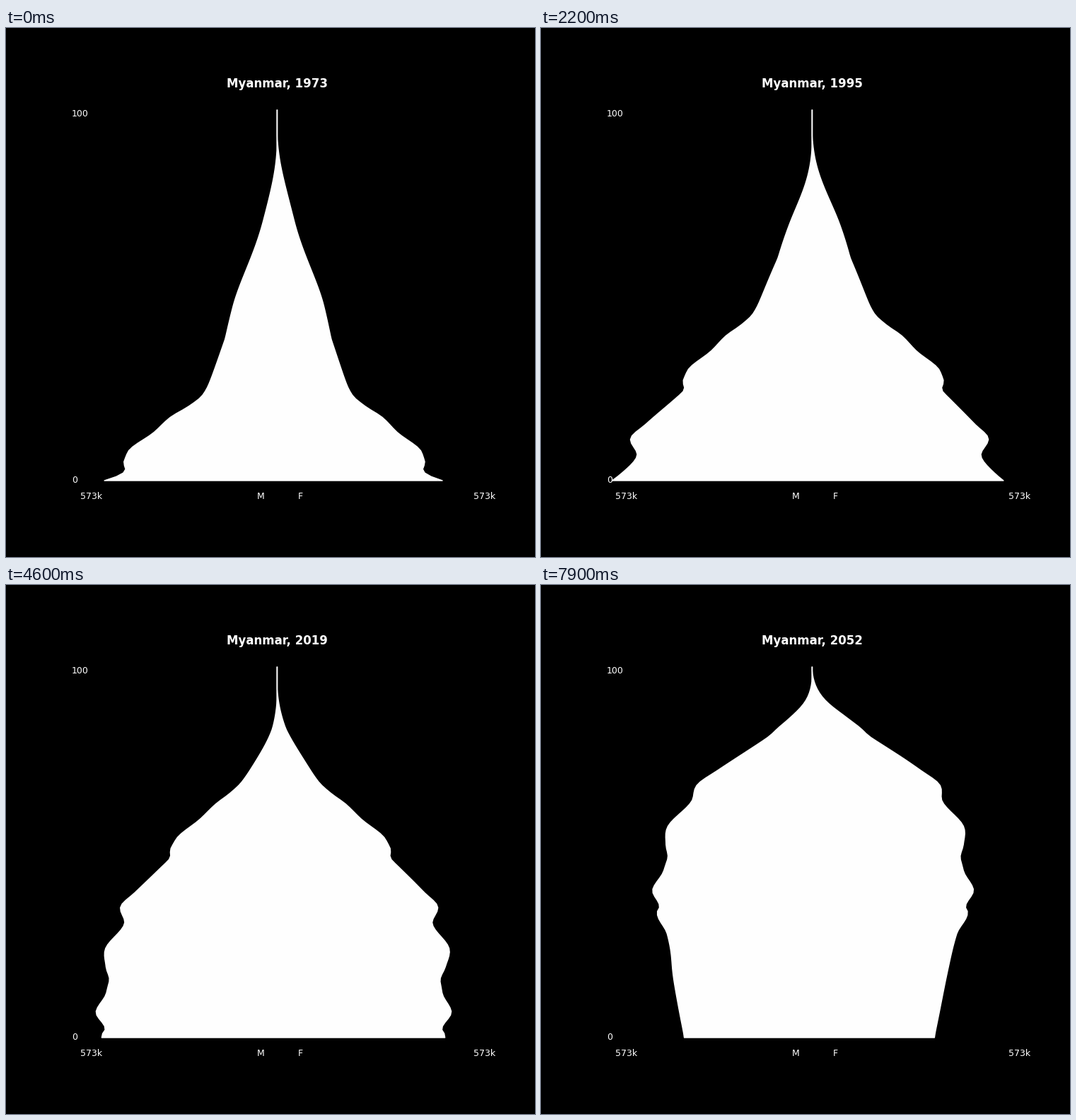
A matplotlib script for the animation above (8000 ms loop, 748 by 748 pixels).

```python
import numpy as np
import matplotlib.pyplot as plt
from matplotlib.animation import FuncAnimation
from matplotlib.patches import Polygon

SIZE, DPI = 748, 100
MID, BASE, STEP = 383.35, 639.5, 5.236   # centre x, y of age 0, pixels per year of age
FIRST, FRAMES = 1973, 80
EDGE = 0.7                               # half the outline width
AGES = np.arange(101)

# Turning points of the birth curve: year, boys born in pixels
BIRTHS = np.array([
    (1887, 77), (1903, 84), (1926, 129), (1941, 135), (1947, 139), (1950, 145),
    (1953, 164), (1956, 190), (1960, 209), (1965.5, 242), (1968, 243), (1970.5, 235),
    (1973, 245), (1980, 273), (1983.5, 287), (1988.5, 267), (1995, 283.5),
    (2000, 270), (2004, 257), (2007, 257), (2012, 266.5), (2017, 248), (2018, 250),
    (2024, 228), (2034, 208), (2052, 181.5)])
GIRLS_PER_BOY = 0.957


def smooth(x, y, at):
    """Cubic curve through the points that never overshoots them."""
    h = np.diff(x)
    d = np.diff(y) / h
    both = d[:-1] * d[1:]
    mean = 2 * both / np.where(both > 0, d[:-1] + d[1:], 1)
    m = np.r_[d[0], np.where(both > 0, mean, 0), d[-1]]
    at = np.clip(at, x[0], x[-1])
    i = np.clip(np.searchsorted(x, at, side="right") - 1, 0, len(h) - 1)
    t = (at - x[i]) / h[i]
    return (y[i] * (1 + 2 * t) * (1 - t) ** 2 + y[i + 1] * t * t * (3 - 2 * t)
            + h[i] * (m[i] * t * (1 - t) ** 2 - m[i + 1] * t * t * (1 - t)))


def half_widths(year):
    """Men and women alive at each age: births thinned by age and cohort."""
    born = year - AGES
    boys = smooth(*BIRTHS.T, born)
    infant = 0.08 * np.exp(-np.maximum(born - 1973, 0) / 25) * (1 - np.exp(-AGES / 1.2))
    rate = np.minimum(0.0068 * np.exp((1966 - born) / 55), 0.012)
    frail = np.maximum(73 + 0.2 * (born - 1966), 67)
    leaving = 0.025 / (1 + np.exp((20 - AGES) / 2))

    def aging(age_of_decline):
        return 0.35 * np.exp((AGES - age_of_decline) / 10)

    men = boys * np.exp(-infant - rate * AGES - aging(frail) - leaving)
    slower = rate - 0.25 * np.minimum(rate, 0.0056)
    women = GIRLS_PER_BOY * boys * np.exp(-infant - slower * AGES - aging(frail + 3))
    return men, women


plt.rcParams["font.family"] = "DejaVu Sans"
fig = plt.figure(figsize=(SIZE / DPI, SIZE / DPI), dpi=DPI, facecolor="black")
ax = fig.add_axes([0, 0, 1, 1])
ax.set(xlim=(0, SIZE), ylim=(SIZE, 0))
ax.axis("off")

shape = Polygon([(0, 0), (1, 1), (0, 1)], closed=True, facecolor="#fefefe",
                edgecolor="#fefefe", linewidth=2 * EDGE * 72 / DPI, joinstyle="round")
ax.add_patch(shape)

for x, y, label in [(93, 125, "100"), (93, 643, "0"), (105, 666, "573k"),
                    (661.4, 666, "573k"), (354.6, 666, "M"), (412.6, 666, "F")]:
    ax.text(x, y, label, color="white", size=9, va="baseline")
title = ax.text(MID, 84, "", color="white", size=12, weight="bold",
                ha="center", va="baseline")


def draw(i):
    year = FIRST + i
    men, women = (np.maximum(w - EDGE, 0.3) for w in half_widths(year))
    y = BASE - STEP * AGES
    y[0] += 0.5
    shape.set_xy(np.column_stack([np.r_[MID - men, (MID + women)[::-1]],
                                  np.r_[y, y[::-1]]]))
    title.set_text(f"Myanmar, {year}")
    return shape, title


anim = FuncAnimation(fig, draw, frames=FRAMES, interval=100, repeat=True, repeat_delay=0)
plt.show()
```
